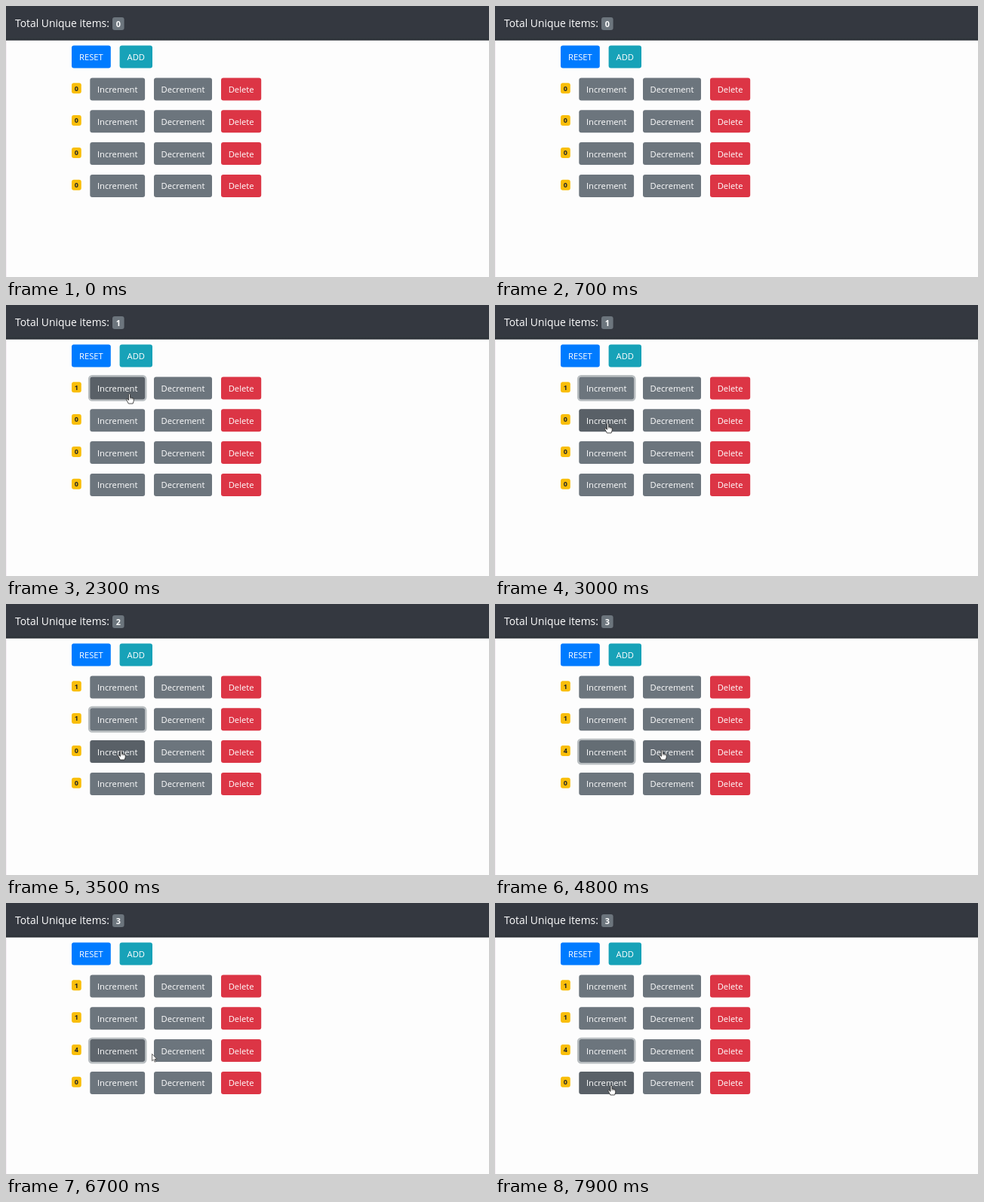
Animation of 640x360 px, one loop 8 s. Source, as an HTML page:

```html
<!DOCTYPE html>
<html lang="en">
<head>
<meta charset="utf-8">
<title>Counter list</title>
<style>
  html, body { margin: 0; width: 100%; height: 100%; overflow: hidden; background: #fdfdfd; }
  svg { display: block; width: 100%; height: 100%; }
  text { font-family: "Open Sans", "Noto Sans", sans-serif; fill: #fff; }
  .label { font-size: 11.2px; text-anchor: middle; }
  .count { font-size: 9px; font-weight: 700; text-anchor: middle; fill: #212529; }
  .total { font-size: 10.8px; font-weight: 700; text-anchor: middle; }
  .title { font-size: 13.9px; }
</style>
</head>
<body>
<svg id="stage" viewBox="0 0 640 360">
  <defs>
    <linearGradient id="edge" x2="0" y2="1">
      <stop offset="0" stop-color="#343a40"/>
      <stop offset="1" stop-color="#2b2f35"/>
    </linearGradient>
  </defs>
  <rect width="640" height="360" fill="#fdfdfd"/>
  <rect y="45" width="1" height="315" fill="#f6eff5"/>
  <rect width="640" height="45.5" fill="#343840"/>
  <rect y="42" width="640" height="3.5" fill="url(#edge)"/>
  <text class="title" x="12" y="28">Total Unique items:</text>
  <rect x="141" y="15" width="15.6" height="17" rx="3" fill="#6c757d"/>
  <text class="total" id="total" x="148.8" y="27.6">0</text>
  <g id="controls"></g>
  <g id="hand" stroke="#222" stroke-width=".8" stroke-linejoin="round" fill="#fff">
    <path d="M-1 .9Q0-.8 1 .9V5L2.7 5.2 4.4 5.7 5.7 6.5V9.6L4.6 13H-1.2L-2.6 10.2-4.1 7.6Q-4 6.2-2.5 7L-1 8.4Z"/>
    <path d="M1 5V7.4M2.8 5.3V7.5M4.4 5.8V7.6" fill="none" stroke-width=".5"/>
  </g>
  <path id="arrow" d="M0 0V9.3L2.1 7.4 3.6 10.8 5 10.2 3.5 6.9H6.4Z" fill="#fff" stroke="#333" stroke-width=".7"/>
</svg>
<script>
const LOOP = 8000, STEP = 100, FADE = 150;
const ROW_TOP = 95.4, ROW_PITCH = 42.85, HEIGHT = 30;
const $ = id => document.getElementById(id);
const controls = $("controls");

// Pointer waypoints: time, x, y
const path = [
  [800, 212, 374], [1250, 165, 121], [1400, 163.5, 118], [2450, 163.5, 118],
  [2750, 150, 156], [3000, 149.5, 157], [3150, 149.5, 158], [3400, 152, 193],
  [3500, 152.5, 194], [4500, 152.5, 194], [4650, 160, 195], [4800, 221.5, 194],
  [4900, 227, 195], [5600, 227, 195], [5950, 156, 196], [6600, 158, 195],
  [6700, 193.5, 200.5], [6900, 230, 198], [7200, 228, 200], [7800, 156, 240],
  [7900, 154, 242]
];

// Clicks: time, row, change
const clicks = [
  [1700, 0, 1], [3100, 1, 1],
  [3700, 2, 1], [3900, 2, 1], [4100, 2, 1], [4300, 2, 1],
  [5100, 2, -1], [5400, 2, -1], [6200, 2, 1], [6400, 2, 1]
];

function add(tag, attrs, text = "") {
  const node = document.createElementNS("http://www.w3.org/2000/svg", tag);
  for (const key in attrs) node.setAttribute(key, attrs[key]);
  node.textContent = text;
  return controls.appendChild(node);
}

function addButton(label, x, y, width, fill) {
  const box = { x, y, width, height: HEIGHT, rx: 3 };
  const ring = add("rect", {
    x: x - 1.2, y: y - 1.2, width: width + 2.4, height: HEIGHT + 2.4, rx: 4,
    fill: "none", stroke: "#828a91", "stroke-opacity": .55, "stroke-width": 2.4, opacity: 0
  });
  add("rect", { ...box, fill });
  const shade = add("rect", { ...box, fill: "#000", opacity: 0 });
  add("text", { class: "label", x: x + width / 2, y: y + 19.5 }, label);
  return { x, y, width, ring, shade };
}

addButton("RESET", 87, 52.4, 51.8, "#007bff");
addButton("ADD", 150.6, 52.4, 43.4, "#17a2b8");

const rows = [0, 1, 2, 3].map(i => {
  const y = ROW_TOP + i * ROW_PITCH;
  add("rect", { x: 87, y: y + 6.8, width: 12.8, height: 14, rx: 3, fill: "#f9be0a" });
  const count = add("text", { class: "count", x: 93.4, y: y + 17.1 }, "0");
  const plus = addButton("Increment", 111.3, y, 72.8, "#6c757d");
  const minus = addButton("Decrement", 196, y, 77, "#6c757d");
  addButton("Delete", 285, y, 53.2, "#dc3545");
  return { count, plus, minus };
});
const buttons = rows.flatMap(row => [row.plus, row.minus]);

function pointerAt(time) {
  const next = path.findIndex(point => point[0] > time);
  if (next <= 0) return path[next < 0 ? path.length - 1 : 0].slice(1);
  const [t0, x0, y0] = path[next - 1], [t1, x1, y1] = path[next];
  const p = (time - t0) / (t1 - t0), ease = p * p * (3 - 2 * p);
  return [x0 + (x1 - x0) * ease, y0 + (y1 - y0) * ease];
}

const isOver = (b, [x, y]) =>
  x >= b.x && x <= b.x + b.width && y >= b.y && y <= b.y + HEIGHT;

// Share of the fade window spent hovering gives a linear transition.
function hoverShade(button, trail) {
  return trail.filter(point => isOver(button, point)).length / trail.length;
}

function render(time) {
  const counts = [0, 0, 0, 0];
  let focused = null;
  for (const [at, row, change] of clicks) {
    if (at > time) break;
    counts[row] += change;
    focused = change > 0 ? rows[row].plus : rows[row].minus;
  }
  rows.forEach((row, i) => row.count.textContent = counts[i]);
  $("total").textContent = counts.filter(Boolean).length;

  const trail = Array.from({ length: 15 }, (_, i) => pointerAt(time - i * FADE / 15));
  for (const button of buttons) {
    button.shade.setAttribute("opacity", .18 * hoverShade(button, trail));
    button.ring.setAttribute("opacity", button === focused ? 1 : 0);
  }

  const [x, y] = trail[0];
  const over = buttons.some(button => isOver(button, trail[0]));
  for (const id of ["hand", "arrow"]) {
    $(id).setAttribute("transform", `translate(${x} ${y})`);
    $(id).style.display = (id === "hand") === over ? "" : "none";
  }
}

const start = performance.now();
function tick() {
  const elapsed = (performance.now() - start) % LOOP;
  render(Math.floor(elapsed / STEP) * STEP);
  requestAnimationFrame(tick);
}
tick();
</script>
</body>
</html>
```
